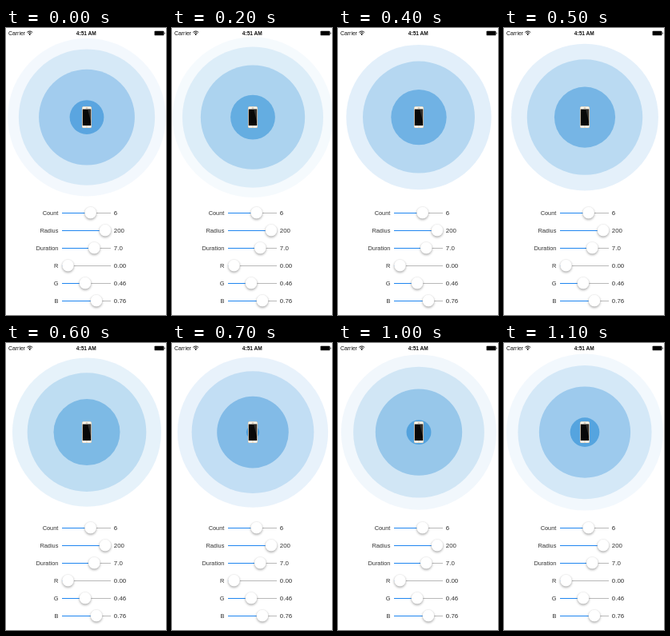
Recreate the animation shown at these times as an HTML page with a canvas. Size 200 px wide and 359 px high, loop 1.2 s.

```html
<!DOCTYPE html>
<html lang="en">
<head>
<meta charset="utf-8">
<title>Pulsing halo</title>
<style>
  html, body { margin: 0; width: 100%; height: 100%; overflow: hidden; background: #fff; }
  canvas, svg { position: absolute; left: 0; top: 0; width: 200px; height: 359px; display: block; }
  text { font-family: "Liberation Sans", Arial, sans-serif; }
  .bar { font-size: 6.9px; fill: #111; }
  .time { font-size: 6.6px; font-weight: bold; fill: #111; text-anchor: middle; }
  .label { font-size: 7.4px; fill: #333; text-anchor: end; }
  .value { font-size: 7.9px; fill: #333; }
</style>
</head>
<body>
<canvas id="stage"></canvas>
<svg id="words" viewBox="0 0 200 359">
  <text class="bar" x="3" y="8.8">Carrier</text>
  <text class="time" x="100.3" y="8.8">4:51 AM</text>
</svg>
<script>
const W = 200, H = 359, LOOP = 1200, STEP = 100;
const CX = 101, CY = 111.6;
const COUNT = 6, MAX_R = 107.5, START = 0.1565;
const FAINT = 0.033; // edges weaker than this do not show
const GONE = 0.015;  // rings weaker than this leave no tint

// label, value, thumb x
const rows = [
  ["Count", "6", 105.7],
  ["Radius", "200", 124],
  ["Duration", "7.0", 110.3],
  ["R", "0.00", 77.5],
  ["G", "0.46", 99],
  ["B", "0.76", 113]
];
const rowY = i => 231 + i * 22;

const canvas = document.getElementById("stage");
const ctx = canvas.getContext("2d");
const dpr = window.devicePixelRatio || 1;
canvas.width = W * dpr;
canvas.height = H * dpr;
ctx.scale(dpr, dpr);

function addText(cls, x, y, str) {
  const el = document.createElementNS("http://www.w3.org/2000/svg", "text");
  el.setAttribute("class", cls);
  el.setAttribute("x", x);
  el.setAttribute("y", y);
  el.textContent = str;
  document.getElementById("words").appendChild(el);
}

rows.forEach(([label, value], i) => {
  addText("label", 65.4, rowY(i) + 2.5, label);
  addText("value", 134.8, rowY(i) + 2.6, value);
});

function disc(x, y, r, fill) {
  ctx.fillStyle = fill;
  ctx.beginPath();
  ctx.arc(x, y, r, 0, Math.PI * 2);
  ctx.fill();
}

function box(x, y, w, h, r, fill) {
  ctx.fillStyle = fill;
  ctx.beginPath();
  ctx.roundRect(x, y, w, h, r);
  ctx.fill();
}

// cubic-bezier(0.25, 0.1, 0.25, 1)
function ease(x) {
  let lo = 0, hi = 1;
  for (let i = 0; i < 24; i++) {
    const s = (lo + hi) / 2;
    if (0.75 * s * (1 - s) + s ** 3 < x) lo = s; else hi = s;
  }
  const s = lo, q = 1 - s;
  return 0.3 * s * q * q + 3 * s * s * q + s ** 3;
}

function drawHalo(t) {
  const rings = [];
  let edge = 0;
  for (let i = -1; i < COUNT; i++) {
    const x = START + (i + t / LOOP) / COUNT;
    if (x <= 0 || x >= 1) continue;
    const e = ease(x);
    const alpha = 0.45 * Math.min(1, (1 - e) / 0.8);
    if (alpha < GONE) continue;
    const r = MAX_R * e;
    if (alpha >= FAINT) edge = Math.max(edge, r);
    rings.push({ r, alpha });
  }
  for (const { r, alpha } of rings) {
    disc(CX, CY, Math.min(r, edge), `rgba(0,118,204,${alpha})`);
  }
}

function drawPhone() {
  box(95, 98.3, 12, 26.8, 1.7, "#dfc3a0");
  box(95.5, 98.6, 11, 26.2, 1.4, "#fff8ec");
  box(95.8, 101.6, 10.4, 20.4, 0, "#080808");
  ctx.fillStyle = "#32302d";
  ctx.beginPath();
  ctx.moveTo(106, 101.7);
  ctx.lineTo(106, 117);
  ctx.lineTo(102.2, 101.7);
  ctx.fill();
  box(99.6, 99.8, 2.8, 0.6, 0.3, "#9b8b76");
  disc(101, 123.4, 0.9, "#d3b78f");
  disc(101, 123.4, 0.55, "#fffaf0");
}

function drawStatus() {
  ctx.strokeStyle = "#111";
  ctx.lineWidth = 1;
  for (const r of [2.9, 4.7]) {
    ctx.beginPath();
    ctx.arc(29.7, 8.7, r, -Math.PI * 0.76, -Math.PI * 0.24);
    ctx.stroke();
  }
  disc(29.7, 8, 1, "#111");

  box(185.6, 3.7, 11.8, 5.6, 0.9, "#000");
  box(197.7, 5.5, 0.9, 2, 0.4, "#000");
}

function drawSlider(x, y) {
  box(70, y, 61, 1, 0, "#b8b8b8");
  box(70, y, x - 70, 1, 0, "#1f86f0");
  ctx.save();
  ctx.shadowColor = "rgba(0,0,0,0.32)";
  ctx.shadowBlur = 3 * dpr;
  ctx.shadowOffsetY = 1.5 * dpr;
  disc(x, y, 7.4, "#fff");
  ctx.restore();
  ctx.strokeStyle = "rgba(0,0,0,0.1)";
  ctx.lineWidth = 0.4;
  ctx.beginPath();
  ctx.arc(x, y, 7.4, 0, Math.PI * 2);
  ctx.stroke();
}

function draw(t) {
  ctx.fillStyle = "#fff";
  ctx.fillRect(0, 0, W, H);
  drawHalo(t);
  drawPhone();
  drawStatus();
  rows.forEach((row, i) => drawSlider(row[2], rowY(i)));
}

let begin = null;
function tick(now) {
  if (begin === null) begin = now;
  const t = (now - begin) % LOOP;
  draw(Math.floor(t / STEP) * STEP);
  requestAnimationFrame(tick);
}
draw(0);
requestAnimationFrame(tick);
</script>
</body>
</html>
```
